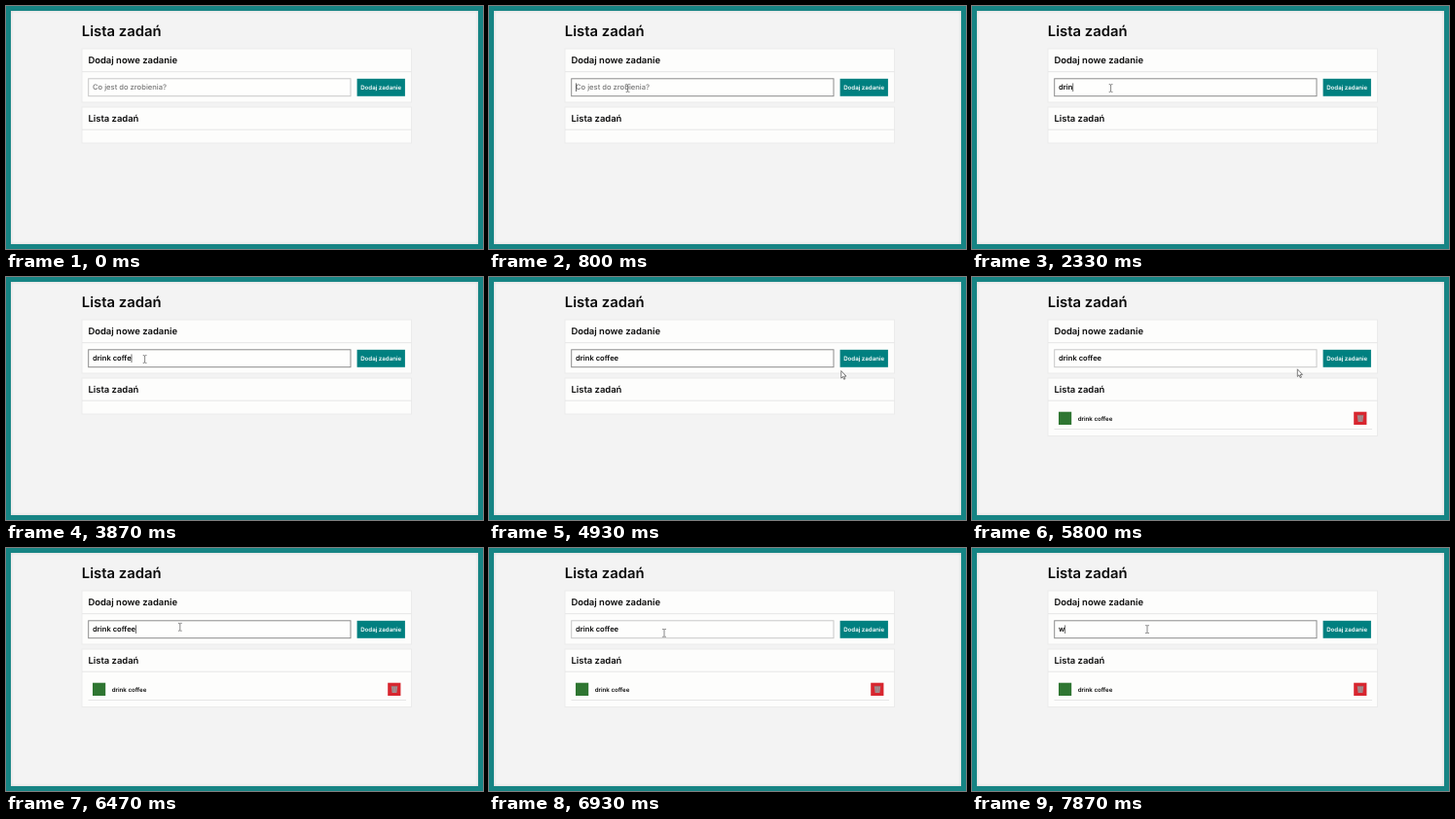
Write an HTML page that moves like this. It is 490 px wide and 250 px high and loops after 8 s.

```html
<!DOCTYPE html>
<html lang="pl">
<head>
<meta charset="utf-8">
<title>Lista zadań</title>
<style>
  html, body { margin: 0; width: 100%; height: 100%; overflow: hidden; }
  .page {
    position: relative; box-sizing: border-box; width: 490px; height: 250px;
    border: 5px solid #168484; background: #f3f3f3;
    box-shadow: inset 0 0 3px rgba(0, 0, 0, .14);
  }
  svg { position: absolute; left: -5px; top: -5px; display: block; }
  text {
    font-family: Inter, "Open Sans", sans-serif; font-weight: 600;
    fill: #0a0a0a; text-rendering: geometricPrecision; white-space: pre;
  }
  .title { font-size: 14.85px; }
  .heading { font-size: 9.45px; }
  .field { font-size: 7.6px; }
  .hint { font-weight: 500; fill: #777; }
  .small { font-size: 6.15px; }
  .card { fill: #fdfdfc; stroke: #ebebeb; }
  .rule { stroke: #e6e6e6; }
</style>
</head>
<body>
<div class="page">
  <svg width="490" height="250" viewBox="0 0 490 250">
    <text class="title" x="77.8" y="31.4">Lista zadań</text>

    <rect class="card" x="78" y="44" width="338.5" height="55"/>
    <path class="rule" d="M78 67.7H416.5"/>
    <text class="heading" x="84.4" y="59">Dodaj nowe zadanie</text>
    <rect id="input" x="84.7" y="74.8" width="269.3" height="17.9" fill="#fefefd"/>
    <rect id="selection" x="89" y="78.5" height="10" fill="#3390ff"/>
    <text id="hint" class="field hint" x="89" y="86.4">Co jest do zrobienia?</text>
    <text id="value" class="field" x="89" y="86.4"></text>
    <rect id="caret" y="79.4" width=".7" height="8.6" fill="#333"/>
    <rect id="button" x="360.6" y="74.8" width="49.3" height="18"/>
    <text class="small" x="385.2" y="86" text-anchor="middle" style="fill:#fff">Dodaj zadanie</text>

    <rect id="list" class="card" x="78" y="104" width="338.5"/>
    <path class="rule" d="M78 127.2H416.5"/>
    <text class="heading" x="84.4" y="118.6">Lista zadań</text>
    <g id="item">
      <rect x="89" y="138.7" width="13.2" height="13.3" fill="#2f7632"/>
      <text class="small" x="108.7" y="147.6">drink coffee</text>
      <rect x="392.2" y="138.7" width="13.2" height="13.3" fill="#d8262f"/>
      <path d="M395.8 142.3H402.2L401.4 149H396.6Z" fill="#a98c8e"/>
      <path d="M395.6 142.3H402.4M397.7 143.5V148M400.2 143.5V148" stroke="#85757a" stroke-width=".5"/>
      <path class="rule" d="M84.5 156.5H411"/>
    </g>

    <path id="arrow" d="M0 0V7.6L1.7 6L2.9 8.8L4.1 8.3L2.9 5.6H5.2Z" fill="#fff" stroke="#444" stroke-width=".7"/>
    <path id="beam" d="M-1.9 -3.9H-.6L0 -3.4L.6 -3.9H1.9M0 -3.4V3.4M-1.9 3.9H-.6L0 3.4L.6 3.9H1.9" fill="none" stroke="#555" stroke-width=".7"/>
  </svg>
</div>
<script>
  const $ = id => document.getElementById(id);
  const LOOP = 8000, FPS = 15;

  // All tables start with the tick (1/15 s) at which a row takes effect.
  const typed = [
    [0, ''], [25, 'd'], [30, 'dr'], [32, 'dri'], [35, 'drin'], [38, 'drink'],
    [41, 'drink '], [47, 'drink c'], [49, 'drink co'], [52, 'drink cof'],
    [55, 'drink coff'], [58, 'drink coffe'], [63, 'drink coffee'],
    [113, ''], [118, 'w']
  ];
  const focus = [[0, false], [8, true], [82, false], [95, true], [101, false], [105, true]];
  const caretOn = [
    [0, false], [8, true], [16, false], [24, true], [41, false], [43, true],
    [71, false], [80, true], [82, false], [95, true], [101, false], [105, true],
    [112, false], [113, true]
  ];
  const path = [
    [1, 215, 21], [4, 180, 50], [8, 143.5, 84.5], [10, 143.5, 84.5], [12, 142.6, 84.5],
    [66, 142.6, 84.5], [70, 250, 106], [74, 361.8, 96.5], [78, 383, 86],
    [82, 383, 86], [84, 375, 89], [87, 334.3, 94.8], [91, 225, 86], [94, 178.8, 81.3],
    [100, 178.8, 81.3], [101, 180, 95], [102, 180, 95], [105, 180, 83.6], [120, 180, 83.6]
  ];

  const at = (rows, k) => rows.findLast(r => r[0] <= k)[1];

  function pointer(k) {
    const i = Math.max(1, path.findIndex(p => p[0] >= k));
    const [k0, x0, y0] = path[i - 1], [k1, x1, y1] = path[i];
    const u = (k - k0) / (k1 - k0);
    return [x0 + (x1 - x0) * u, y0 + (y1 - y0) * u];
  }

  const inside = (x, y, l, t, r, b) => x > l && x < r && y > t && y < b;
  const show = (id, on) => { $(id).style.display = on ? '' : 'none'; };
  const set = (id, name, v) => $(id).setAttribute(name, v);

  function draw(t) {
    const k = Math.floor((t + 5) * FPS / 1000) % (LOOP * FPS / 1000);
    const text = at(typed, k), added = k >= 82;

    $('value').textContent = text;
    const width = text ? $('value').getComputedTextLength() : 0;
    show('hint', !text);
    show('caret', at(caretOn, k));
    set('caret', 'x', 89 + width);
    set('selection', 'width', width);
    show('selection', k === 112);
    $('value').style.fill = k === 112 ? '#fff' : '';
    set('input', 'stroke', at(focus, k) ? '#8c8c8c' : '#c8c8c8');

    show('item', added);
    set('list', 'height', added ? 59.5 : 37);

    const [x, y] = pointer(Math.max(1, k));
    const overInput = inside(x, y, 84, 74, 354, 93);
    show('beam', k > 0 && overInput);
    show('arrow', k > 0 && !overInput);
    for (const id of ['beam', 'arrow']) set(id, 'transform', `translate(${x} ${y})`);
    set('button', 'fill', inside(x, y, 360, 74, 410, 93) ? '#009999' : '#008080');
  }

  const start = performance.now();
  function tick() {
    draw((performance.now() - start) % LOOP);
    requestAnimationFrame(tick);
  }
  tick();
</script>
</body>
</html>
```
